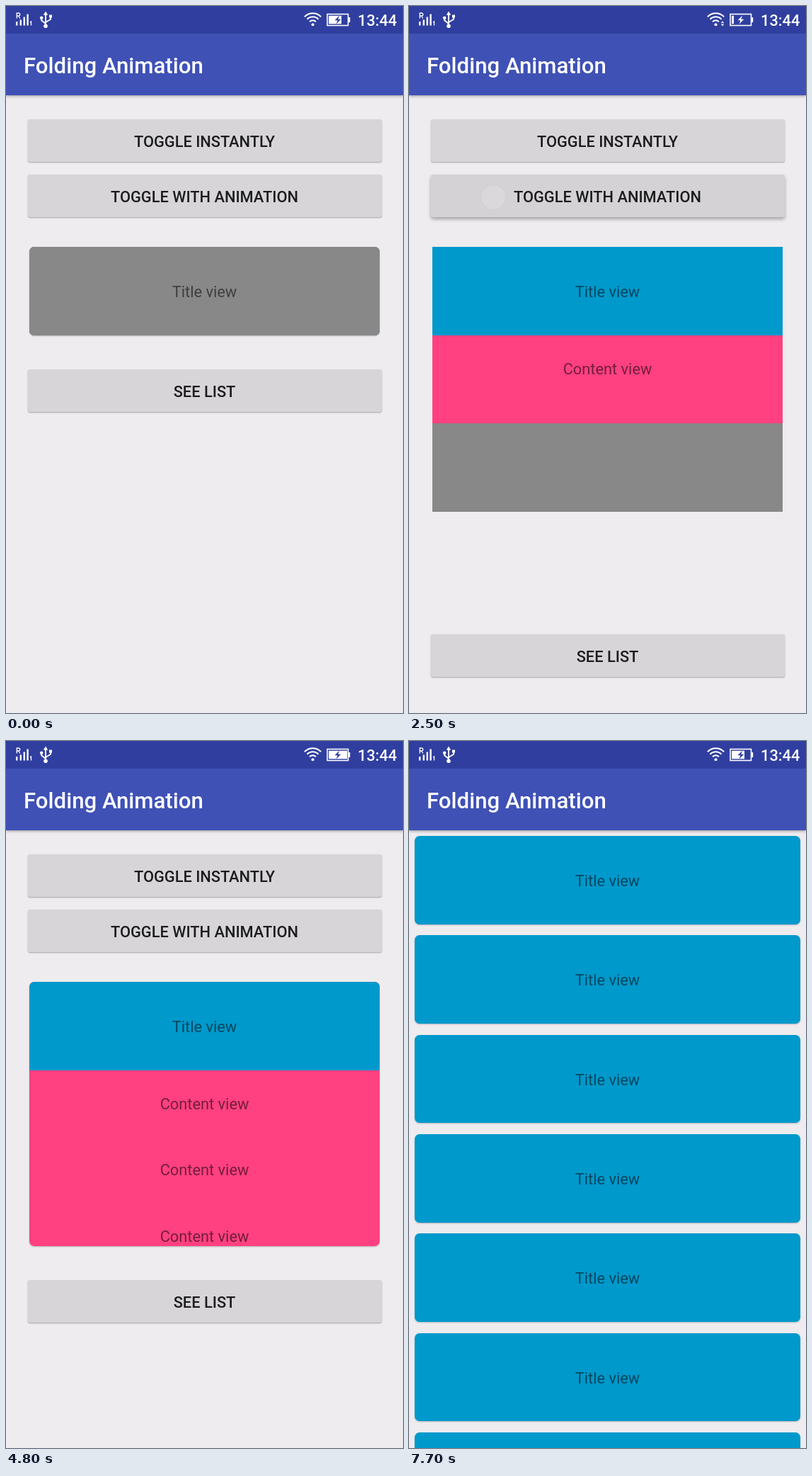
Recreate the animation shown at these times as an HTML page. Size 561 by 998 pixels, loop 8000 ms.

```html
<!DOCTYPE html>
<html lang="en">
<head>
<meta charset="utf-8">
<title>Folding Animation</title>
<style>
html, body { margin: 0; width: 100%; height: 100%; overflow: hidden; }
body { position: relative; background: #eeecef; font: 21.8px Roboto, sans-serif; }
div { position: absolute; box-sizing: border-box; }
.screen { inset: 0; overflow: hidden; background: #eeecef; }
.bar {
  left: 0; top: 39px; width: 100%; height: 87px; padding-left: 25px; background: #3f51b5;
  color: #fff; font-size: 31.2px; font-weight: 500; line-height: 91px; white-space: nowrap;
  box-shadow: 0 1px 4px rgba(0, 0, 0, .4);
}
.btn {
  left: 30.5px; width: 500px; height: 60px; border-radius: 3px; background: #d7d5d8;
  box-shadow: 0 1px 2px rgba(0, 0, 0, .32);
  color: rgba(0, 0, 0, .87); font-weight: 500; line-height: 63px; text-align: center;
}
#cell { left: 33px; top: 340px; width: 495px; overflow: hidden; }
.title, .line { left: 0; width: 100%; color: rgba(0, 0, 0, .54); text-align: center; }
.title { top: 0; height: 124.67px; background: #0099cc; line-height: 127px; }
.line { line-height: 95px; }
.content { left: 0; top: 0; width: 100%; height: 498.67px; background: #ff4081; }
.part { left: 0; width: 100%; height: 124.67px; transform-origin: 50% 0; }
.slice { inset: 0; overflow: hidden; }
.front { left: 0; top: 0; width: 100%; height: 100%; background: #888; transform-origin: 50% 100%; }
.item { left: 8px; width: 545px; height: 124.5px; border-radius: 7px; }
.item, .rest { box-shadow: 0 1px 2px rgba(0, 0, 0, .25); }
.rest { border-radius: 7px; }
#dot {
  width: 36px; height: 36px; margin: -18px; border-radius: 50%;
  background: rgba(255, 255, 255, .45); border: 1.5px solid rgba(0, 0, 0, .14);
}
#status { position: absolute; left: 0; top: 0; background: #303f9f; }
</style>
</head>
<body>
<div class="screen">
  <div class="bar">Folding Animation</div>
  <div class="btn" style="top:160px">TOGGLE INSTANTLY</div>
  <div class="btn" id="toggle" style="top:238px">TOGGLE WITH ANIMATION</div>
  <div id="cell"></div>
  <div class="btn" id="see">SEE LIST</div>
</div>
<div class="screen" id="list"><div class="bar">Folding Animation</div></div>
<div id="dot"></div>
<svg id="status" width="561" height="39" fill="#fff">
  <path d="M14 22h2.4v5.5H14zM19.6 19.5H22v8h-2.4zM24.6 15.5H27v12h-2.4zM29.4 11.5h2.4v16h-2.4z"/>
  <path d="M15.3 17.5V10h2.4a2 2 0 0 1 0 4h-2.4M17.6 14l2.2 3.5M34 23l1.5-1v5.5" fill="none" stroke="#fff" stroke-width="1.3"/>
  <path d="M56 11V28M50.2 17v3.2L56 25M63 15v3.8L56 23" fill="none" stroke="#fff" stroke-width="1.9"/>
  <path d="M56 7.5l3.2 5.3h-6.4zM61 12.5h4v4h-4z"/>
  <circle cx="56" cy="28.3" r="2.8"/><circle cx="50.2" cy="16.8" r="2.3"/>
  <circle cx="433.5" cy="26.3" r="2"/>
  <path d="M429.1 22.2a6 6 0 0 1 8.8 0M425.5 18.7a11 11 0 0 1 16 0M421.9 15.3a16 16 0 0 1 23.2 0" fill="none" stroke="#fff" stroke-width="2"/>
  <path id="arrows" d="M440.8 24l2.2-2.8 2.2 2.8zM440.8 25.6l2.2 2.8 2.2-2.8z"/>
  <rect x="454" y="11.5" width="29.5" height="16" fill="none" stroke="#fff" stroke-width="1.6"/>
  <path d="M484 16h2.2v7H484z"/>
  <path d="M471 13.5l-6.5 6.8h4l-2 5.2 6.8-6.8h-4z"/>
  <svg id="level" x="456" y="13.5" height="12">
    <path d="M0 0h26v12H0z"/>
    <path d="M15 0l-6.5 6.8h4l-2 5.2 6.8-6.8h-4z" fill="#303f9f"/>
  </svg>
  <text x="497" y="28.4" font-weight="500">13:44</text>
</svg>
<script>
const LOOP = 8000, PART = 124.67, FLIP = 105, GROW = 339;
const toggles = [[705, true], [2296, false], [4156, true]];      // start, unfolds
const touches = [[500, 690, 270], [2200, 2290, 270], [4000, 4140, 270], [7080, 7150, 918]]; // down, up, y
const levels = [3, 12, 18, 26];

const $ = id => document.getElementById(id);
const clamp = (v, max = 1) => Math.min(max, Math.max(0, v));
const decel = t => 1 - (1 - t) ** 2;
// Chained decelerating steps: 0..n
const chain = (v, n) => {
  v = clamp(v, n);
  return Math.floor(v) + decel(v % 1);
};

function add(parent, cls, text = '', top) {
  const el = document.createElement('div');
  el.className = cls;
  el.textContent = text;
  if (top !== undefined) el.style.top = top + 'px';
  return parent.appendChild(el);
}

function addContent(parent, top) {
  const el = add(parent, 'content', '', top);
  add(el, 'title', 'Title view');
  for (let i = 0; i < 4; i++) add(el, 'line', 'Content view', 124.5 + i * 93.5);
  return el;
}

const cell = $('cell');
const parts = [], fronts = [];
for (let i = 0; i < 4; i++) {
  parts[i] = add(cell, 'part', '', i * PART);
  addContent(add(parts[i], 'slice'), -i * PART);
  if (i < 3) fronts[i] = add(parts[i], i ? 'front' : 'front title', i ? '' : 'Title view');
}
const whole = addContent(cell, 0);
for (let i = 0; i < 7; i++) add($('list'), 'title item', 'Title view', 134 + i * 140.35);

const show = (el, on) => { el.style.display = on ? '' : 'none'; };

function rotate(el, angle) {
  show(el, Math.abs(angle) < 89.9);
  el.style.transform = angle ? `perspective(1122px) rotateX(${angle}deg)` : 'none';
}

function drawCell(t) {
  let open = 0, grown = 0;
  for (const [start, unfolds] of toggles) {
    if (t < start) break;
    const flips = chain((t - start) / FLIP, 6);
    open = unfolds ? flips : 6 - flips;
    grown = unfolds ? chain((t - start) / GROW, 3) : 3 - chain((t - start - 2 * FLIP) / GROW, 3);
  }
  const height = 124.5 + grown * PART;
  const isOpen = open === 6;
  parts.forEach((el, i) => {
    rotate(el, i ? 90 * (1 - clamp(open - 2 * i + 1)) : 0);
    if (isOpen) show(el, false);
  });
  fronts.forEach((el, i) => rotate(el, -90 * clamp(open - 2 * i)));
  show(whole, isOpen);
  cell.className = open === 0 || isOpen ? 'rest' : '';
  cell.style.height = (open === 0 ? 124.5 : height) + 'px';
  $('see').style.top = 388.5 + height + 'px';
}

function drawTouch(t) {
  const [down, up, y] = touches.findLast(touch => t >= touch[0]) || [LOOP, LOOP, 0];
  const dot = $('dot').style;
  dot.left = '119px';
  dot.top = y + 'px';
  dot.opacity = t < down ? 0 : clamp(1 - (t - up) / 300);
  const press = clamp((t - down) / 100) * clamp((up + 320 - t) / 100);
  for (const [id, on] of [['toggle', y < 500], ['see', y > 500]]) {
    const p = on ? press : 0, style = $(id).style;
    style.boxShadow = `0 ${1 + 2 * p}px ${2 + 3 * p}px rgba(0,0,0,.32)`;
    style.backgroundColor = `rgb(${215 - 3 * p},${213 - 3 * p},${216 - 3 * p})`;
  }
}

function draw(t) {
  drawCell(t);
  drawTouch(t);
  const enter = decel(clamp((t - 7150) / 240));
  show($('list'), enter > 0);
  $('list').style.opacity = enter;
  $('list').style.transform = enter < 1 ? `translateY(${80 * (1 - enter)}px)` : 'none';
  $('level').setAttribute('width', levels[Math.floor((t + 2300) / 1000) % 4]);
  show($('arrows'), (t >= 2200 && t < 4000) || (t >= 6200 && t < 7100));
}

function tick(now) {
  draw(now % LOOP);
  requestAnimationFrame(tick);
}
draw(0);
requestAnimationFrame(tick);
</script>
</body>
</html>
```
